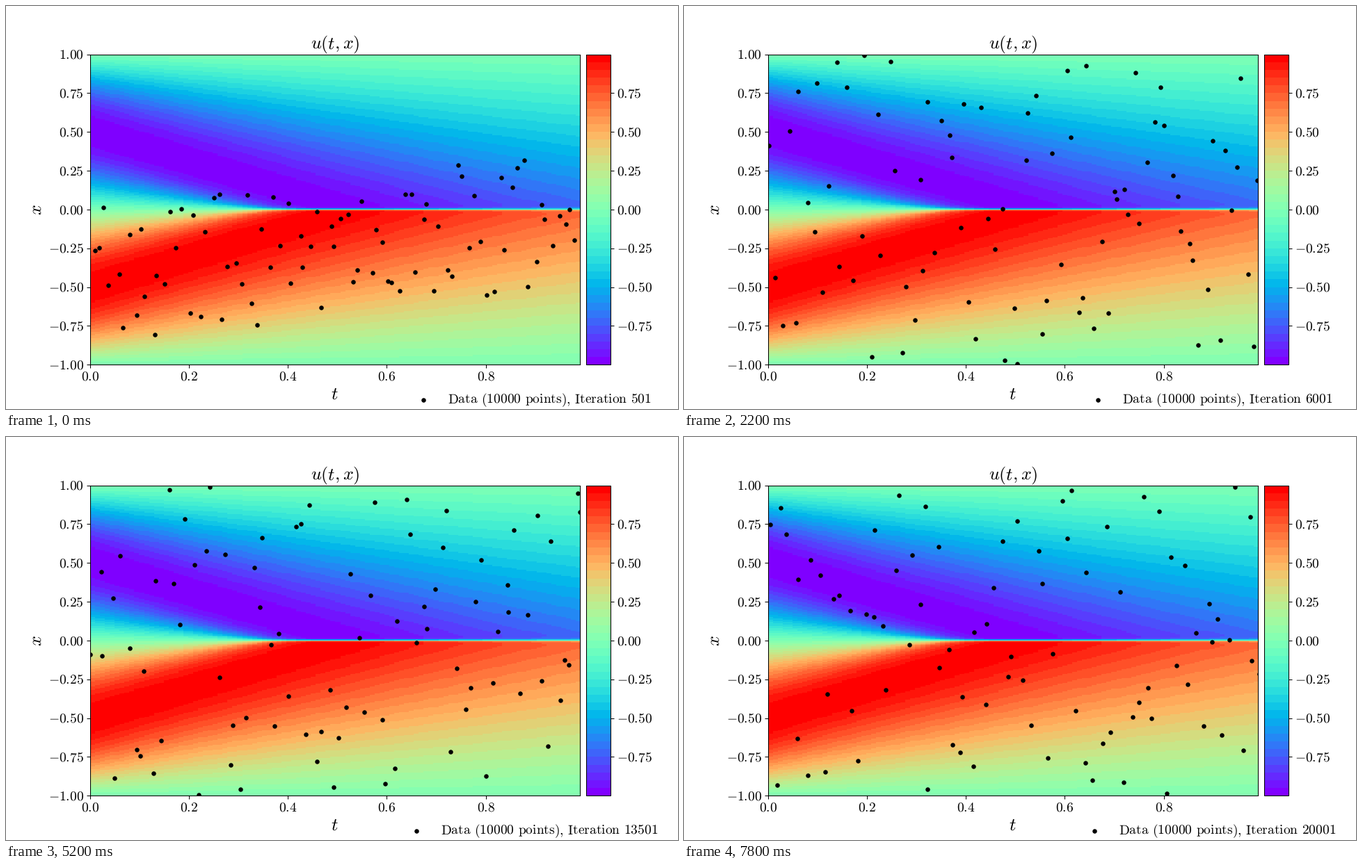
A matplotlib script for the animation above (8000 ms loop, 966 by 580 pixels).

```python
import numpy as np
import matplotlib.pyplot as plt
from matplotlib.animation import FuncAnimation
from matplotlib.lines import Line2D

W, H, DPI = 966, 580, 93.5
FRAMES, STEP_MS = 40, 200
POINTS = 84
T_MAX = 0.99
NU = 0.01 / np.pi

# Axes edges in pixels: a bar of 5% width, 0.1 inch to the right of the field.
LEFT, TOP, RIGHT, BOTTOM = 0.125 * W, 0.12 * H, 0.9 * W, 0.89 * H
PAD = 0.1 * DPI
FIELD_W = (RIGHT - LEFT - PAD) / 1.05

plt.rcParams.update({"mathtext.fontset": "cm", "font.size": 15,
                     "text.hinting": "no_hinting"})


def burgers(t, x, order=100):
    """Viscous Burgers flow from -sin(pi x), by Cole-Hopf and Gauss-Hermite."""
    z, w = np.polynomial.hermite.hermgauss(order)
    y = x[:, None, None] - np.sqrt(4 * NU * t)[None, :, None] * z
    f = w * np.exp(-np.cos(np.pi * y) / (2 * np.pi * NU))
    return -(np.sin(np.pi * y) * f).sum(-1) / f.sum(-1)


def box(left, right):
    return [left / W, 1 - BOTTOM / H, (right - left) / W, (BOTTOM - TOP) / H]


def label(x, y, text, **kw):
    return fig.text(x / W, 1 - y / H, text, **kw)


def numbers(values, digits):
    return [f"${v:.{digits}f}$" for v in values]


def sample(k):
    """Latin hypercube points; the covered band opens up to the full domain."""
    rng = np.random.default_rng(100 + k)
    t = (np.arange(POINTS) + rng.random(POINTS)) / POINTS
    s = (rng.permutation(POINTS) + rng.random(POINTS)) / POINTS
    grow = min(1, k / 4)
    low = (1 - grow) * (-0.87 + 0.37 * t) - grow
    high = (1 - grow) * (0.04 + 0.34 * t) + grow
    return t, low + (high - low) * s


def caption(k):
    count = str(501 + 500 * k)
    # The comma already brings part of its space.
    text = f"Data (10000 points),Iteration {count}"
    text = text.replace(" ", r"\hspace{0.38}").replace(",", r",\hspace{0.18}")
    return rf"$\mathrm{{{text}}}$", len(count)


fig = plt.figure(figsize=((W + 0.01) / DPI, (H + 0.01) / DPI), dpi=DPI,
                 facecolor="white")
ax = fig.add_axes(box(LEFT, LEFT + FIELD_W))
cax = fig.add_axes(box(LEFT + FIELD_W + PAD, RIGHT))

field = burgers(np.linspace(0, T_MAX, 100), np.linspace(-1, 1, 256))
image = ax.imshow(field, cmap=plt.get_cmap("rainbow", 40), vmin=-1, vmax=1,
                  extent=[0, T_MAX, -1, 1], origin="lower", aspect="auto",
                  interpolation="nearest")
ax.set_xlim(0, T_MAX)
ax.set_ylim(-1, 1)

t_ticks = np.arange(5) * 0.2
x_ticks = np.arange(-4, 5) * 0.25
ax.set_xticks(t_ticks, numbers(t_ticks, 1))
ax.set_yticks(x_ticks, numbers(x_ticks, 2))
bar = fig.colorbar(image, cax=cax)
bar.set_ticks(x_ticks[1:-1], labels=numbers(x_ticks[1:-1], 2))

ax.set_title("$u(t,x)$", fontsize=20)
label(472.5, 559, "$t$", fontsize=20, ha="center", va="center")
label(44, 293.5, "$x$", fontsize=20, ha="center", va="center", rotation=90)

dots, = ax.plot([], [], "ko", markersize=4)
key = Line2D([0], [0], marker="o", color="black", markersize=4,
             linestyle="none", transform=fig.transFigure)
fig.add_artist(key)
note = label(635, 572, "", ha="left", va="baseline")


def draw(k):
    dots.set_data(*sample(k))
    text, digits = caption(k)
    shift = 4.86 * (digits - 3)
    note.set_text(text)
    note.set_x((634.5 - shift) / W)
    key.set_data([(599.5 - shift) / W], [1 - 567 / H])
    return dots, note, key


anim = FuncAnimation(fig, draw, frames=FRAMES, interval=STEP_MS,
                     init_func=lambda: draw(0), repeat=True, blit=False)
plt.show()
```
